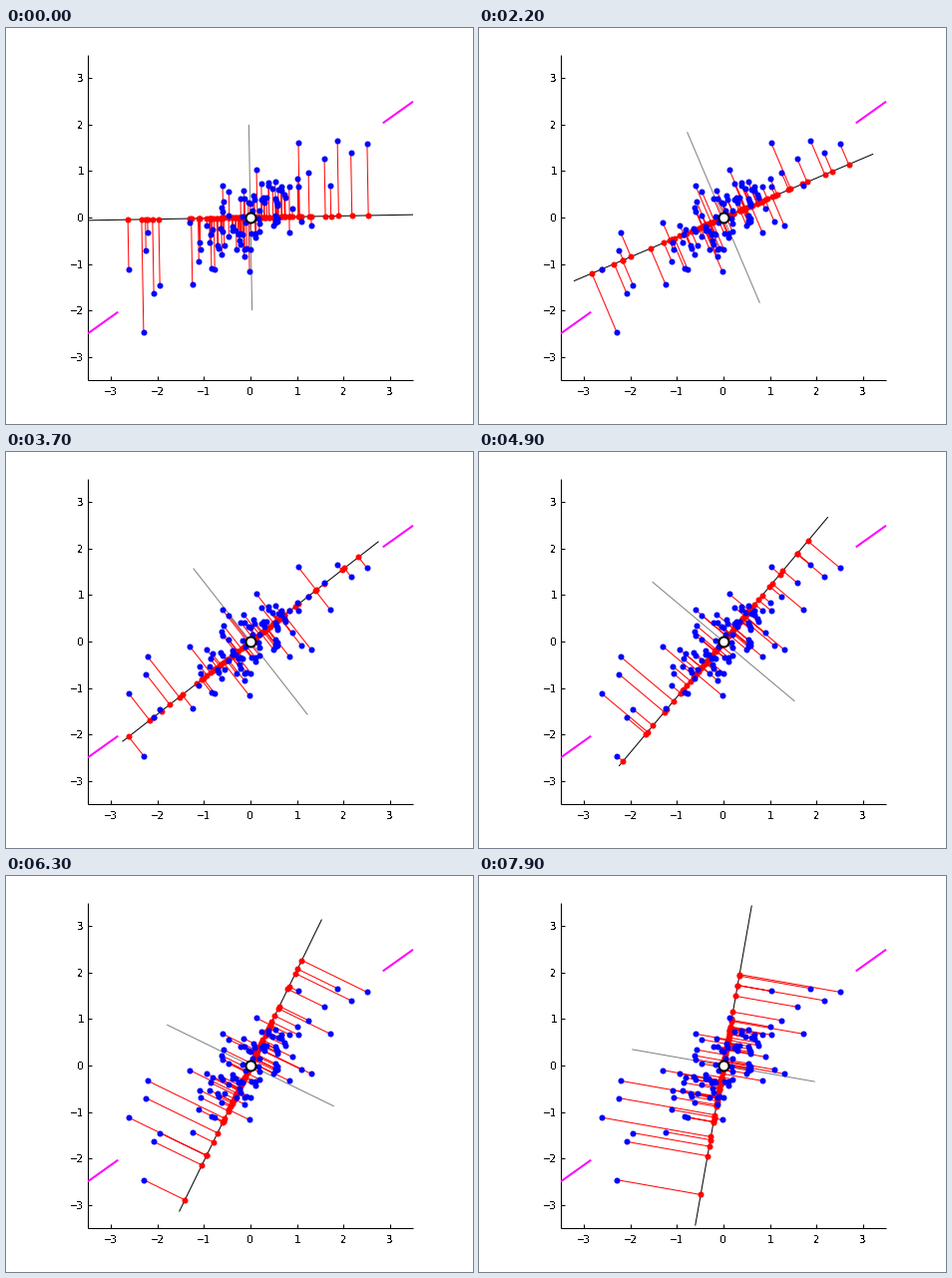
Recreate the animation shown at these times as a matplotlib script. Size 468x397 px, loop 8000 ms.

```python
import numpy as np
import matplotlib.pyplot as plt
from matplotlib.animation import FuncAnimation

plt.rcParams["path.simplify"] = False
plt.rcParams["text.antialiased"] = False

W, H = 468, 397
PX = 0.72                       # points per pixel at 100 dpi
ORIGIN = np.array([245, 190])
HALF = 163                      # half the plot box
UNIT = HALF / 3.5
FRAMES = 80
TILT = np.radians(35.5)         # direction of greatest variance


def make_cloud(count, seed=42):
    """Correlated normal core inside an ellipse, plus the outlying points."""
    outer = np.array([
        (-2.62, -1.12), (-2.21, -0.33), (-2.25, -0.70), (-2.30, -2.46),
        (-2.08, -1.64), (-1.95, -1.45), (-1.31, -0.10), (-1.25, -1.43),
        (-0.60, 0.68), (-0.02, -1.17), (0.13, 1.02), (0.84, -0.33),
        (1.31, -0.18), (1.03, 1.60), (1.59, 1.26), (1.72, 0.68),
        (1.87, 1.66), (2.16, 1.40), (2.51, 1.58),
    ])
    rng = np.random.default_rng(seed)
    uv = rng.normal(0, [1.0, 0.41], (4 * count, 2))
    inside = np.hypot(uv[:, 0] / 1.6, uv[:, 1] / 0.85) < 1
    u, v = uv[inside][:count - len(outer)].T
    c, s = np.cos(TILT), np.sin(TILT)
    core = np.column_stack([u * c - v * s, u * s + v * c])
    return np.vstack([outer, core])


data = make_cloud(100) * [UNIT, -UNIT]

fig = plt.figure(figsize=(W / 100, H / 100), dpi=100, facecolor="white")
ax = fig.add_axes([0, 0, 1, 1])
ax.set_xlim(0, W)
ax.set_ylim(H, 0)
ax.axis("off")


def line(xs, ys, color, width=1, z=1):
    return ax.plot(xs, ys, color=color, lw=width * PX, zorder=z,
                   solid_capstyle="butt")[0]


def dots(color, z):
    return ax.plot([], [], "o", color=color, ms=6 * PX, mew=0, zorder=z)[0]


def label(x, y, n, align):
    family = "DejaVu Sans Mono" if n else "DejaVu Sans"
    ax.text(x, y, str(n).replace("-", "\u2212"), family=family,
            fontsize=10.7 * PX, ha=align, va="center_baseline")


def draw_axes():
    cx, cy = ORIGIN
    left, bottom = cx - HALF, cy + HALF
    line([left, left], [cy - HALF, bottom], "black")
    line([left, cx + HALF], [bottom, bottom], "black")
    for n in range(-3, 4):
        x, y = np.round([cx + n * UNIT, cy - n * UNIT])
        line([x, x], [bottom, bottom - 4], "black")
        line([left, left + 4], [y, y], "black")
        label(x, bottom + 11, n, "center")
        label(left - 4, y, n, "right")


def draw_principal():
    for side in (-1, 1):
        xs = side * np.array([HALF * np.cos(TILT), HALF])
        line(ORIGIN[0] + xs, ORIGIN[1] - np.tan(TILT) * xs, "magenta", 2, 2)


draw_axes()
draw_principal()

links = line([], [], "red", z=3)
main = line([], [], "black", z=4)
normal = line([], [], "0.5", z=4)
shadows = dots("red", 5)
points = dots("blue", 6)
points.set_data(*(data + ORIGIN).T)
ax.plot(*ORIGIN, "o", ms=10 * PX, mfc="white", mec="black", mew=2 * PX, zorder=7)


def update(i):
    a = np.radians(i + 1)
    w = np.array([np.cos(a), -np.sin(a)])
    n = np.array([w[1], -w[0]])
    proj = np.outer(data @ w, w)

    gap = np.full_like(proj, np.nan)
    path = np.stack([data, proj, gap], axis=1).reshape(-1, 2)
    links.set_data(*(path + ORIGIN).T)
    shadows.set_data(*(proj + ORIGIN).T)

    ends = np.array([[-1], [1]])
    main.set_data(*(ORIGIN + ends * HALF * w).T)
    normal.set_data(*(ORIGIN + ends * 2 * UNIT * n).T)
    return links, main, normal, shadows


anim = FuncAnimation(fig, update, frames=FRAMES, interval=100, repeat=True,
                     repeat_delay=0, blit=False)
plt.show()
```
